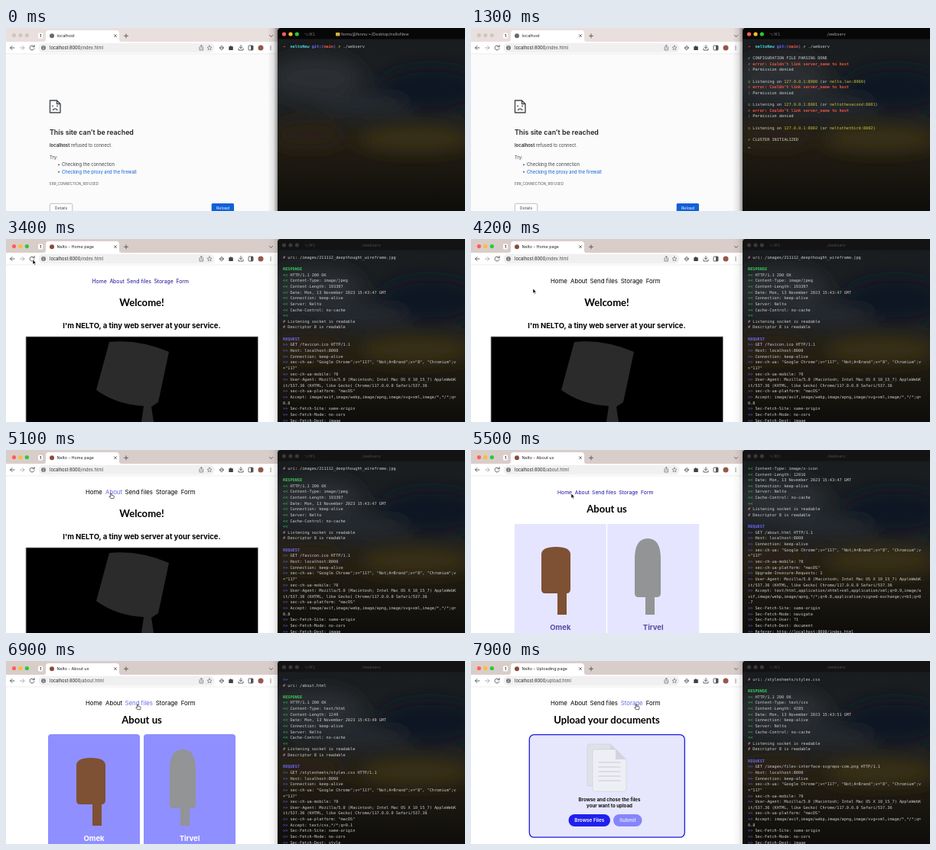
Animation, 600 px wide and 240 px high, one loop 8000 ms. Source, as an HTML page:

```html
<!DOCTYPE html>
<html lang="en">
<head>
<meta charset="utf-8">
<title>Tiny web server demo</title>
<style>
html, body { margin: 0; width: 100%; height: 100%; overflow: hidden; background: #fff; }
svg { display: block; width: 600px; height: 240px; font-family: Inter, "Open Sans", sans-serif; }
.term { font: 5.23px "DejaVu Sans Mono", "Liberation Mono", monospace; white-space: pre; }
.head { font: 700 13.1px Lato, "Open Sans", sans-serif; }
</style>
</head>
<body>
<svg viewBox="0 0 600 240" xmlns="http://www.w3.org/2000/svg">
  <defs>
    <filter id="blur" x="-50%" y="-50%" width="200%" height="200%"><feGaussianBlur stdDeviation="11"/></filter>
    <clipPath id="window"><path d="M355 240V5q0-5 5-5H600V240z"/></clipPath>
    <linearGradient id="shadow"><stop offset="0" stop-opacity="0"/><stop offset=".6" stop-opacity=".25"/><stop offset="1"/></linearGradient>
    <linearGradient id="dusk" x2="0" y2="1">
      <stop offset="0" stop-color="#191b1d"/><stop offset=".4" stop-color="#1e2226"/>
      <stop offset=".65" stop-color="#221d13"/><stop offset="1" stop-color="#0e0d0a"/>
    </linearGradient>
  </defs>
  <g id="page"></g>
  <g clip-path="url(#window)">
    <rect x="355" width="245" height="240" fill="url(#dusk)"/>
    <g filter="url(#blur)">
      <ellipse cx="405" cy="65" rx="60" ry="28" fill="#2b2f31"/>
      <ellipse cx="555" cy="80" rx="70" ry="30" fill="#111821"/>
      <ellipse cx="470" cy="100" rx="60" ry="10" fill="#272c30"/>
      <ellipse cx="535" cy="145" rx="75" ry="16" fill="#3a3019"/>
      <ellipse cx="395" cy="140" rx="50" ry="16" fill="#2a2213"/>
    </g>
    <g id="term"></g>
  </g>
  <g id="cursor"></g>
</svg>
<script>
const LOOP = 8000, FOCUS = 1900, ROWS = 29, COLS = 72;
const LOAD = { home: 3300, about: 5420, upload: 7000 }, FADE = 400;
const clamp = v => Math.max(0, Math.min(1, v));
const lerp = (a, b, p) => a + (b - a) * p;
const mix = (a, b, p) => `rgb(${a.map((v, i) => Math.round(lerp(v, b[i], p)))})`;
const esc = s => s.replace(/&/g, '&amp;').replace(/</g, '&lt;').replace(/>/g, '&gt;');

const text = (x, y, size, str, fill = '#202124', extra = '') =>
  `<text x="${x}" y="${y}" font-size="${size}" fill="${fill}" ${extra}>${esc(str)}</text>`;
const rect = (x, y, w, h, fill, r = 0, extra = '') =>
  `<rect x="${x}" y="${y}" width="${w}" height="${h}" rx="${r}" fill="${fill}" ${extra}/>`;
const dot = (x, y, r, fill) => `<circle cx="${x}" cy="${y}" r="${r}" fill="${fill}"/>`;
const line = (d, color = '#505357', w = .9) =>
  `<path d="${d}" fill="none" stroke="${color}" stroke-width="${w}" stroke-linecap="round" stroke-linejoin="round"/>`;
const MID = ' text-anchor="middle"', BOLD = ' font-weight="700"', SEMI = ' font-weight="600"';
const heading = (str, y = 82.3) => `<text class="head" x="177.5" y="${y}"${MID}>${str}</text>`;
const lights = (xs, y, on, off) =>
  xs.map((x, i) => dot(x, y, 2.6, on ? ['#fe5f57', '#febc2e', '#28c840'][i] : off)).join('');

// Browser

const TITLES = {
  error: ['localhost', 'index.html'], home: ['Nelto - Home page', 'index.html'],
  about: ['Nelto - About us', 'about.html'], upload: ['Nelto - Uploading page', 'upload.html']
};
const NAV = [['Home', 104, 22], ['About', 130, 22], ['Send files', 155.5, 36], ['Storage', 195.8, 28], ['Form', 228.8, 18]];

function chrome(page, active) {
  const [title, path] = TITLES[page];
  return rect(0, 0, 356, 18, active ? '#d9cdca' : '#e9dfdc')
    + lights([10.5, 18.9, 27.3], 9.6, active, '#cfc6c3')
    + rect(42, 6.5, 6, 7, '#fff', 1.5) + text(45, 12, 5, '1', '#333', MID + BOLD)
    + `<path d="M49 18q3 0 3-3V7q0-4 4-4h88q4 0 4 4v8q0 3 3 3z" fill="#fff"/>`
    + dot(60, 10.3, 3, page === 'error' ? '#66696d' : '#8a4b38')
    + text(66.5, 12.2, 5.4, title)
    + line('M141.5 8.7l3 3m0-3l-3 3M154.5 10.3h5m-2.5-2.5v5M344.5 9.5l2 2 2-2')
    + rect(0, 18, 356, 16, '#fff')
    + line('M11 26H5.5m2.5-2.5L5.5 26 8 28.5')
    + line('M18.5 26H24m-2.5-2.5L24 26l-2.5 2.5', '#a9abae')
    + line('M36.5 24.2a3 3 0 1 0 .5 2.6M37.2 22.5v2.2h-2.2')
    + rect(42.5, 19.7, 230, 12.6, '#f1f0f0', 6.3)
    + dot(49, 26, 3, '#77797c') + dot(49, 24.6, .5, '#fff') + line('M49 26v1.6', '#fff', .7)
    + `<text x="57" y="28" font-size="5.7" fill="#202124">localhost:8000<tspan fill="#4c4f53">/${path}</tspan></text>`
    + line('M253 25v4h4.5v-4M255.3 27v-4.5m-1.5 1.5l1.5-1.5 1.5 1.5', '#5f6368', .7)
    + line('M266 23l.9 2 2.1.2-1.6 1.4.5 2.1-1.9-1.1-1.9 1.1.5-2.1-1.6-1.4 2.1-.2z', '#5f6368', .6)
    + line('M279.5 26l2.5-2.8 2.5 2.8-2.5 2.8zM279.5 26h5')
    + `<path d="M291.3 24.3h1.6q.8-2.6 1.9 0h2v4.7h-5.5z" fill="#3c4043"/>`
    + line('M307 22.5v4m-2-1.7l2 2 2-2M304 27v2h6v-2')
    + rect(317, 23, 6, 6, 'none', 1, 'stroke="#505357" stroke-width=".9"') + rect(320, 23, 3, 6, '#505357')
    + dot(333, 26, 3.5, '#94584b')
    + [23.8, 26, 28.2].map(y => dot(346, y, .65, '#505357')).join('')
    + rect(0, 33.7, 356, .5, '#dfdcdb')
    + rect(342, 0, 13, 240, 'url(#shadow)', 0, `opacity="${active ? .15 : .4}"`)
    + rect(355, 0, 6, 6, '#8d8583');
}

const errorPage = () => rect(0, 34, 356, 206, '#fbfbfb')
  + line('M57.5 95h9l4.5 4.5V111H57.5zM66.5 95v4.5H71', '#46494d', 1.4)
  + line('M61 102v.8m6-.8v.8M61.5 107.5q2.7-3.2 5.4 0', '#46494d', 1.4)
  + text(57, 139.5, 8.85, 'This site can’t be reached', '#202124', SEMI)
  + `<text x="57" y="156" font-size="5.85" fill="#3c4043"><tspan font-weight="700">localhost</tspan> refused to connect.</text>`
  + text(57, 171.5, 5.85, 'Try:', '#3c4043')
  + dot(69, 179.3, .9, '#3c4043') + text(73, 181.3, 5.85, 'Checking the connection', '#3c4043')
  + dot(69, 188.7, .9, '#3c4043') + text(73, 190.7, 5.85, 'Checking the proxy and the firewall', '#1160d0')
  + text(57, 206, 4.55, 'ERR_CONNECTION_REFUSED', '#55585c')
  + rect(57.3, 230.3, 29.5, 14, '#fff', 1.5, 'stroke="#a4a7ab" stroke-width=".7"')
  + text(72, 238.3, 5.2, 'Details', '#45484c', MID)
  + rect(268.7, 230, 29.3, 14, '#1160d8', 1.5) + text(283.5, 238.3, 5.2, 'Reload', '#fff', MID);

const nav = (p, hover) => {
  const s = lerp(.842, 1, p);
  return `<g transform="translate(${175.5 * (1 - s)} ${55 * (1 - s)}) scale(${s})">`
    + NAV.map(([label, x]) => text(x, 58, 7.8, label,
      label === hover ? '#6a6ae6' : mix([34, 20, 200], [0, 0, 0], p))).join('') + '</g>';
};

const homePage = () => heading('Welcome!', 88)
  + text(177.5, 117.3, 9.5, "I'm NELTO, a tiny web server at your service.", '#000', MID + BOLD)
  + rect(26, 128, 303.5, 120, '#000', 0, 'stroke="#aaa" stroke-width=".8"')
  + `<path d="M135 135q38-4 78 13l-14 66-9 6 3 20h-16l3-21q-36-2-62-21z" fill="#2b2b2b"/>`;

function aboutPage(p) {
  const card = (x, name, shape, color) =>
    rect(x, lerp(97.2, 96, p), 120, 150, mix([250, 250, 255], [143, 143, 255], p), lerp(0, 4, p))
    + `<path d="${shape}" fill="${color}"/>`
    + text(x + 60, 235.5, 9.5, name, mix([44, 30, 140], [255, 255, 255], p), MID + BOLD);
  return heading('About us')
    + card(lerp(57.3, 55, p), 'Omek', 'M92 183V137q0-10 19-10t19 10v45q0 6-5 6v28h-12v-28h-16q-5 0-5-5z', '#7e5034')
    + card(lerp(177.7, 180, p), 'Tirvel', 'M214 188V143q0-27 17-27t17 27v45q0 5-5 5h-3v23h-12v-23h-9q-5 0-5-5z', '#929496');
}

function uploadPage(p) {
  const sheet = (x, y, fill) =>
    `<path d="M${x} ${y}h27l14 13v39q0 3-3 3h-38q-3 0-3-3v-49q0-3 3-3z" fill="${fill}" stroke="#cccfd8" stroke-width=".6"/>`
    + `<path d="M${x + 27} ${y}v13h14z" fill="#d2d4dd"/>`;
  return heading('Upload your documents')
    + rect(76.3, 96.7, 203, 134.5, mix([250, 250, 255], [230, 230, 253], p), 6, 'stroke="#1d1dde" stroke-width="1.3"')
    + sheet(155, 109, '#dfe1e8') + sheet(162, 116, '#eeeff4')
    + [133, 139, 145, 151, 157].map(y => line(`M167 ${y}h28`, '#c8cad3', 1.2)).join('')
    + text(181, 184, 6.2, 'Browse and chose the files', '#111', MID + BOLD)
    + text(181, 191.8, 6.2, 'your want to upload', '#111', MID + BOLD)
    + rect(127.5, 201, 54.5, 16, '#2020ee', 8) + text(154.8, 211.3, 6.4, 'Browse Files', '#fff', MID + SEMI)
    + rect(186, 201, 37.5, 16, '#8585fb', 8) + text(204.8, 211.3, 6.4, 'Submit', '#e4e4ff', MID + SEMI);
}

function browser(page, t, p, hover) {
  const body = page === 'error' ? errorPage()
    : rect(0, 34, 356, 206, '#fff') + nav(p, hover)
      + { home: homePage, about: aboutPage, upload: uploadPage }[page](p);
  return body + chrome(page, t >= FOCUS);
}

// Terminal: a line is a list of [text, colour, bold]

const C = { text: '#cdcecf', red: '#f0523f', green: '#37d05c', blue: '#6a6af5', yellow: '#c9c43c', cyan: '#4fd3dc', pink: '#d98a98' };
const BLANK = [];
const prompt = [['➜  ', C.red, 1], ['neltoNew ', C.cyan, 1], ['git:(', C.blue, 1], ['main', C.red, 1], [') ', C.blue, 1], ['✗ ', C.yellow, 1], ['./webserv', C.text]];
const done = str => [['✔ ', C.green], [str, C.text]];
const listen = (port, host) => [
  [['✗ error: Couldn’t link server_name to host', C.red, 1]],
  [[': Permission denied', C.text]], BLANK,
  [['○ ', C.yellow], ['Listening on ', C.text], ['127.0.0.1:' + port, C.yellow], [' (or ', C.text], [host + ':' + port, C.yellow], [')', C.text]]
];

function startup(t) {
  const out = [prompt];
  if (t < 100) return out;
  out.push(BLANK, done('CONFIGURATION FILE PARSING DONE'));
  if (t >= 200) out.push(...listen(8000, 'nelto.lan'));
  if (t >= 500) out.push(...listen(8001, 'neltothesecond'));
  if (t >= 1000) out.push(...listen(8002, 'neltothethird'), BLANK, done('CLUSTER INITIALIZED'));
  out.push([['_', '#fff', 1]]);
  return out;
}

const note = str => [['# ', C.pink], [str, C.text]];
function wrap(mark, color, str) {
  const full = mark + ' ' + str, rows = [[[mark, color], [full.slice(mark.length, COLS), C.text]]];
  for (let i = COLS; i < full.length; i += COLS) rows.push([[full.slice(i, i + COLS), C.text]]);
  return rows;
}
const response = (uri, type, length, sec) => [
  [['>>', C.blue]], note('uri: ' + uri), BLANK, [['RESPONSE', C.green, 1]],
  ...['HTTP/1.1 200 OK', 'Content-Type: ' + type, 'Content-Length: ' + length,
    `Date: Mon, 13 November 2023 15:43:${sec} GMT`, 'Connection: keep-alive', 'Server: Nelto', 'Cache-Control: no-cache', '']
    .flatMap(s => wrap('<<', C.green, s)),
  note('Listening socket is readable'), note('Descriptor 8 is readable'), BLANK
];
const AGENT = 'User-Agent: Mozilla/5.0 (Macintosh; Intel Mac OS X 10_15_7) AppleWebKit/537.36 (KHTML, like Gecko) Chrome/117.0.0.0 Safari/537.36';
const PLATFORM = 'sec-ch-ua-platform: "macOS"';
const request = (path, headers) => [
  [['REQUEST', C.blue, 1]],
  ...[`GET ${path} HTTP/1.1`, 'Host: localhost:8000', 'Connection: keep-alive',
    'sec-ch-ua: "Google Chrome";v="117", "Not;A=Brand";v="8", "Chromium";v="117"', 'sec-ch-ua-mobile: ?0', ...headers]
    .flatMap(s => wrap('>>', C.blue, s))
];
const asset = (path, accept, dest) => request(path, [AGENT, PLATFORM, 'Accept: ' + accept,
  'Sec-Fetch-Site: same-origin', 'Sec-Fetch-Mode: no-cors', 'Sec-Fetch-Dest: ' + dest]);
const page = (path, from) => request(path, [PLATFORM, 'Upgrade-Insecure-Requests: 1', AGENT,
  'Accept: text/html,application/xhtml+xml,application/xml;q=0.9,image/avif,image/webp,image/apng,*/*;q=0.8,application/signed-exchange;v=b3;q=0.7',
  'Sec-Fetch-Site: same-origin', 'Sec-Fetch-Mode: navigate', 'Sec-Fetch-User: ?1', 'Sec-Fetch-Dest: document',
  'Referer: http://localhost:8000' + from]);
const IMG = 'image/avif,image/webp,image/apng,image/svg+xml,image/*,*/*;q=0.8', CSS_FILE = '/stylesheets/styles.css';
const styles = () => asset(CSS_FILE, 'text/css,*/*;q=0.1', 'style');

const LOGS = [
  [3300, [...response('/images/211112_deepthought_wireframe.jpg', 'image/jpeg', 193397, 47), ...asset('/favicon.ico', IMG, 'image')]],
  [5400, [...response('/favicon.ico', 'image/x-icon', 12016, 47), ...page('/about.html', '/index.html')]],
  [5600, [...response('/about.html', 'text/html', 1249, 49), ...styles()]],
  [7000, [...response(CSS_FILE, 'text/css', 4285, 49), ...page('/upload.html', '/about.html')]],
  [7100, [...response('/upload.html', 'text/html', 1249, 51), ...styles()]],
  [7200, [...response(CSS_FILE, 'text/css', 4285, 51), ...asset('/images/files-interface-svgrepo-com.png', IMG, 'image')]]
];

function terminal(t) {
  const active = t < FOCUS, log = LOGS.filter(([at]) => t >= at).pop();
  const rows = (log ? log[1] : startup(t)).slice(-ROWS);
  const ink = active ? '#a5a6a7' : '#4c4d4e';
  const title = t < 100
    ? rect(431, 6, 5.5, 4.5, '#d8b13c', .7) + text(438, 10.2, 5.4, 'fennu@fennu:~/Desktop/neltoNew', ink)
    : text(477, 10.2, 5.4, './webserv', ink, MID);
  return rect(355, 0, 245, 14.5, active ? '#070707' : '#131313')
    + lights([363.5, 372, 380.3], 8, active, '#39393b')
    + text(389.5, 10.2, 5.4, '⌥⌘1', active ? '#6c6d6e' : '#454647', 'font-family="DejaVu Sans, sans-serif"') + title
    + rows.map((row, i) => `<text class="term" x="362" y="${25.9 + i * 7.63}">` + row.map(([s, color, bold]) =>
      `<tspan fill="${color}"${bold ? BOLD : ''}>${esc(s)}</tspan>`).join('') + '</text>').join('');
}

// Pointer

const PATH = [[1400, 300, 110], [2000, 120, 70], [2700, 43, 39], [3100, 35, 27], [3400, 35, 27], [4200, 81, 65],
  [5000, 138, 57], [5500, 131, 57], [6000, 154, 57], [6500, 172, 57], [7000, 172, 57], [7600, 204, 57], [7900, 216, 57]];

function pointer(t) {
  const i = PATH.findIndex(([at]) => at > t);
  if (i === 0) return null;
  const b = i < 0 ? PATH[PATH.length - 1] : PATH[i], a = i < 0 ? b : PATH[i - 1];
  const k = a === b ? 0 : (t - a[0]) / (b[0] - a[0]), s = k * k * (3 - 2 * k);
  return { x: lerp(a[1], b[1], s), y: lerp(a[2], b[2], s) };
}
const ARROW = 'M0 0v6.3l1.5-1.3 1 2.2 1-.5-1-2.1h2z';
const HAND = 'M-.6 0q.7-.8 1.3 0v2.3l2.7.6q.8.3.7 1.2l-.6 2.6h-3.8l-2-2.5q.1-.9.8-.6l.9.7z';

const put = (id, html) => {
  const node = document.getElementById(id);
  if (node.last !== html) node.innerHTML = node.last = html;
};

function draw(t) {
  const current = Object.keys(LOAD).filter(k => t >= LOAD[k]).pop() || 'error';
  const p = current === 'error' ? 1 : clamp((t - LOAD[current]) / FADE);
  const pos = pointer(t);
  const over = pos && current !== 'error' && p === 1 && pos.y > 50 && pos.y < 62
    && NAV.find(([, x, w]) => pos.x >= x && pos.x < x + w + 2.5);
  put('page', browser(current, t, p, over ? over[0] : ''));
  put('term', terminal(t));
  const hand = over && pos.x < over[1] + over[2];
  put('cursor', pos ? `<path transform="translate(${pos.x} ${pos.y})" d="${hand ? HAND : ARROW}" fill="${hand ? '#fff' : '#000'}" stroke="${hand ? '#000' : '#fff'}" stroke-width=".6"/>` : '');
}

const start = performance.now();
function tick() {
  draw(Math.floor((performance.now() - start) % LOOP / 100) * 100);
  requestAnimationFrame(tick);
}
tick();
</script>
</body>
</html>
```
